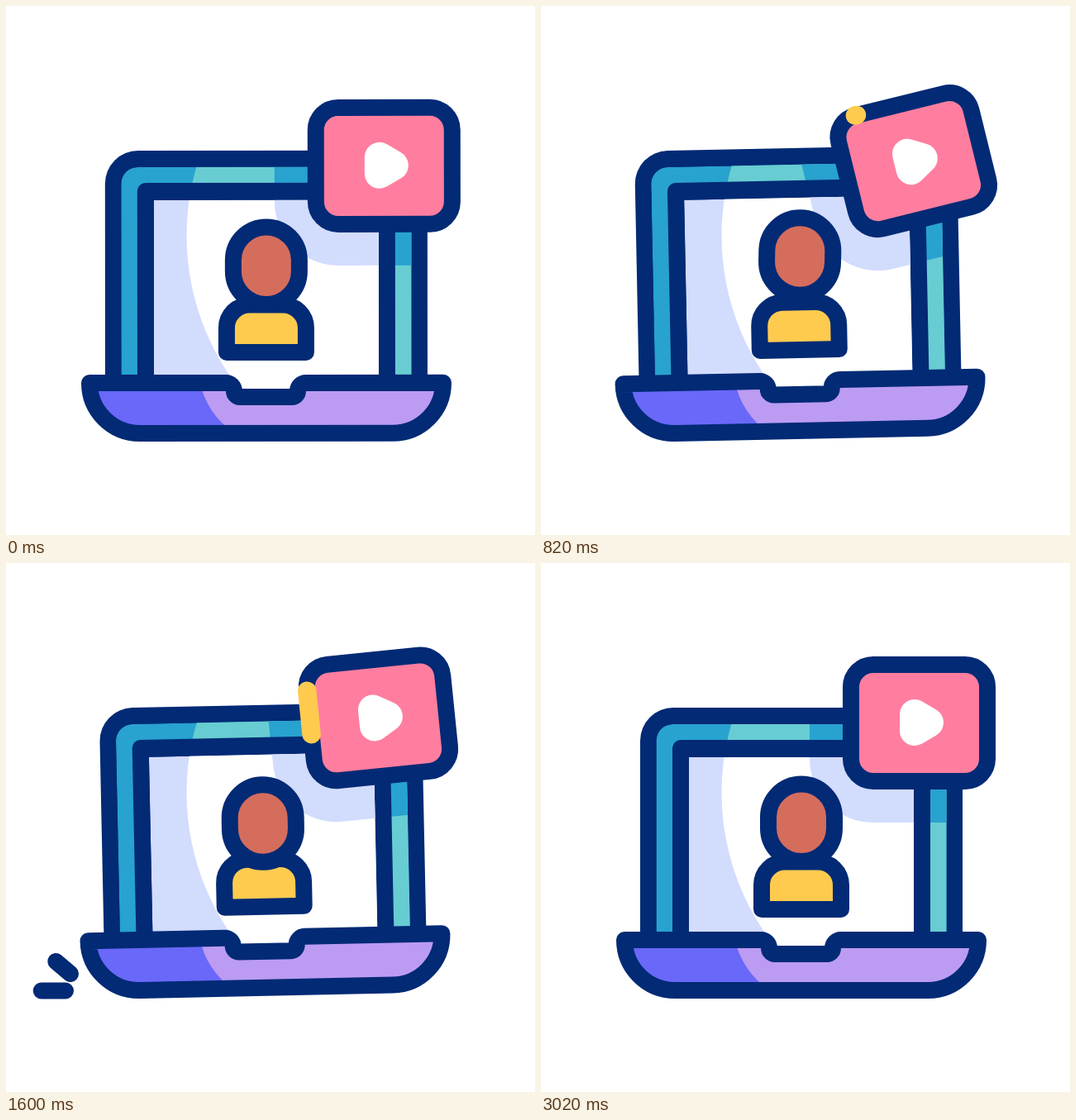
Write an HTML page with a canvas that moves like this. It is 640 px wide and 640 px high and loops after 3220 ms.

```html
<!DOCTYPE html>
<html lang="en">
<head>
<meta charset="utf-8">
<title>Rocking laptop</title>
<style>
html, body { margin: 0; height: 100%; overflow: hidden; background: #fff; }
canvas { display: block; }
</style>
</head>
<body>
<canvas width="640" height="640"></canvas>
<script>
const ctx = document.querySelector('canvas').getContext('2d');
const LOOP = 3220, QUARTER = Math.PI / 2;
const NAVY = '#022a75', YELLOW = '#fecb4f', SKIN = '#d56d5d', PINK = '#ff7e9f', LILAC = '#bc9bf3';

// Rounded box given by its edges
const box = (x1, y1, x2, y2, r) => {
  const p = new Path2D();
  p.roundRect(x1, y1, x2 - x1, y2 - y1, r);
  return p;
};
const disc = (x, y, r) => {
  const p = new Path2D();
  p.arc(x, y, r, 0, 4 * QUARTER);
  return p;
};

const lidOuter = box(120, 175, 510, 460, [40, 40, 0, 0]);
const lidRim = box(139.5, 195, 490.5, 460, [20, 20, 0, 0]);
const lidInner = box(159, 214, 471, 460, [10, 10, 0, 0]);
const screen = box(179, 235, 451, 466, 0);
const base = new Path2D('M101 456H266A10 10 0 0 1 276 466A7 7 0 0 0 283 473H346A7 7 0 0 0 353 466' +
  'A10 10 0 0 1 363 456H529A61 61 0 0 1 468 517H162A61 61 0 0 1 101 456Z');
const head = box(275, 267.5, 355, 361, 40);
const body = box(267, 361.5, 363, 419, [28, 28, 0, 0]);
const card = box(375, 123, 540, 264, 27);
const cardShadow = box(325, 73, 590, 314, 77);
const play = new Path2D('M452 183V203L469 193Z');
const trace = new Path2D('M402 123H513A27 27 0 0 1 540 150V237A27 27 0 0 1 513 264H402' +
  'A27 27 0 0 1 375 237V150A27 27 0 0 1 402 123');
const TRACE_LEN = 2 * (111 + 87) + 54 * Math.PI;
const lidLight = disc(518.5, 278, 300);
const baseLight = disc(330.5, 435, 98);
baseLight.rect(330, 380, 260, 170);

// The laptop rocks from foot to foot: each swing has a length and a peak angle
const swings = [[860, -8.4], [680, 8.4], [540, -3.3], [220, 1.3]];
const RIGHT_HIT = 860, LEFT_HIT = 1540;

const part = (t, from, to) => Math.min(1, Math.max(0, (t - from) / (to - from)));
const easeOut = (x, power) => 1 - (1 - x) ** power;

function rock(t) {
  for (const [length, peak] of swings) {
    if (t < length) {
      const top = 0.48 * length;
      const x = t < top ? 1 - t / top : (t - top) / (length - top);
      return peak * Math.cos(x * QUARTER);
    }
    t -= length;
  }
  return 0;
}

// Springy follow-through: the first peak, then evenly spaced peaks that die out
function ring(t, first, step, peaks) {
  if (t < first) return peaks[0] * Math.sin(t / first * QUARTER);
  const n = (t - first) / step, i = Math.floor(n);
  const a = peaks[i] ?? 0, b = peaks[i + 1] ?? 0;
  return a + (b - a) * (1 - Math.cos((n - i) * Math.PI)) / 2;
}

function turn(x, y, deg) {
  ctx.translate(x, y);
  ctx.rotate(deg * Math.PI / 180);
  ctx.translate(-x, -y);
}

function fill(path, color) {
  ctx.fillStyle = color;
  ctx.fill(path);
}

function stroke(path, color, width = 20) {
  ctx.strokeStyle = color;
  ctx.lineWidth = width;
  ctx.stroke(path);
}

function outlined(path, color) {
  fill(path, color);
  stroke(path, NAVY);
}

// Two dashes that shoot away from the foot that lands
function impact(t, place) {
  const front = easeOut(part(t, 0, 140), 2);
  const back = easeOut(part(t, 80, 280), 2);
  if (front <= back) return;
  for (const [x, y, dx, dy] of [[72, 517.5, -43, 0], [78, 497, -26, -22]]) {
    const p = new Path2D();
    p.moveTo(place(x + dx * back), y + dy * back);
    p.lineTo(place(x + dx * front), y + dy * front);
    stroke(p, NAVY);
  }
}

// A yellow dash that runs once round the card
function runTrace(t) {
  if (t < 819 || t > 1890) return;
  const front = easeOut(part(t, 819, 1890), 1.93) * TRACE_LEN;
  const back = easeOut(part(t, 850, 1890), 1.37) * TRACE_LEN;
  ctx.setLineDash([Math.max(0.1, front - back), 2 * TRACE_LEN]);
  ctx.lineDashOffset = -Math.min(back, TRACE_LEN - 0.2);
  stroke(trace, YELLOW, 22.5);
  ctx.setLineDash([]);
}

function draw(t) {
  const tilt = rock(t);
  const spin = ring(t, 680, 540, [-19.2, 21.5, -11.1, 7.1]);
  const nod = ring(t, 340, 490, [7.8, -8.2, 11, -0.5, 7.2]);
  const lean = ring(t, 340, 490, [-1.8, 2.3, -2.6, 1.9, -1.3]);

  const reset = () => ctx.setTransform(1, 0, 0, 1, 0, 0);
  const onLaptop = () => { reset(); turn(tilt < 0 ? 160 : 470, 527, tilt); };
  const onCard = () => { onLaptop(); turn(457.5, 193.5, spin); };

  // The light stays fixed on the stage while the shape moves under it
  function shade(path, dark, bright, light, shadow) {
    ctx.save();
    onLaptop();
    ctx.clip(path);
    fill(path, dark);
    reset();
    fill(light, bright);
    onCard();
    if (shadow) fill(shadow, dark);
    ctx.restore();
  }

  reset();
  ctx.clearRect(0, 0, 640, 640);
  ctx.lineCap = ctx.lineJoin = 'round';
  impact(t - RIGHT_HIT, x => 637 - x);
  impact(t - LEFT_HIT, x => x);

  onLaptop();
  fill(lidOuter, NAVY);
  shade(lidRim, '#28a2ce', '#67cdd2', lidLight, cardShadow);
  fill(lidInner, NAVY);
  shade(screen, '#d2dcfd', '#fff', lidLight, cardShadow);

  outlined(body, YELLOW);
  ctx.translate(0, nod);
  turn(315, 380, lean);
  outlined(head, SKIN);

  onLaptop();
  shade(base, '#6968f9', LILAC, baseLight);
  stroke(base, NAVY);

  onCard();
  outlined(card, PINK);
  fill(play, '#fff');
  stroke(play, '#fff', 36);
  runTrace(t);
}

const origin = performance.now();
function tick() {
  draw((performance.now() - origin) % LOOP);
  requestAnimationFrame(tick);
}
tick();
</script>
</body>
</html>
```
